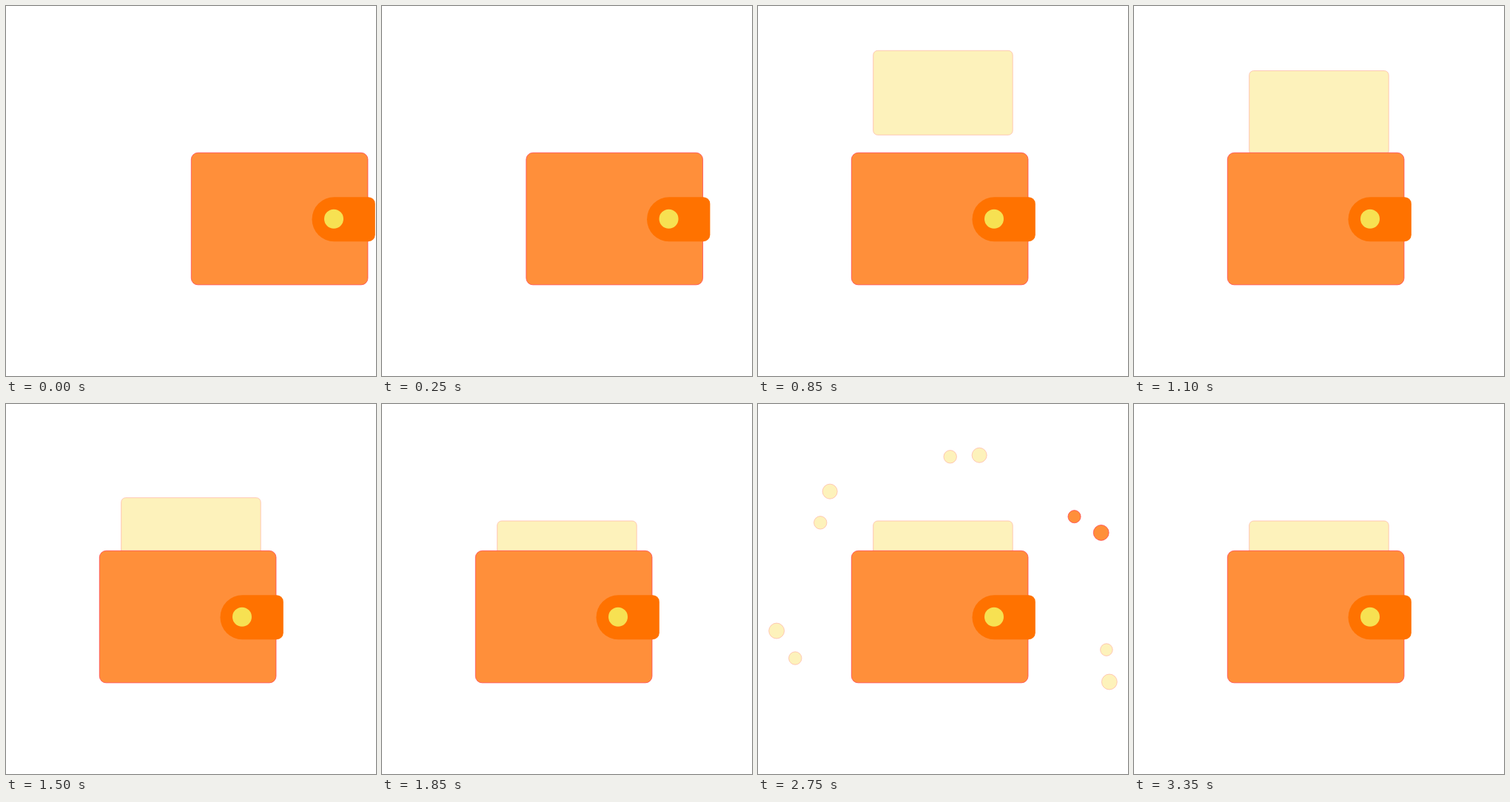
Animation, 500 px wide and 500 px high, one loop 3.4 s. Source, as an HTML page with a canvas:

```html
<!DOCTYPE html>
<html lang="en">
<head>
<meta charset="utf-8">
<title>Wallet</title>
<style>
  html, body { margin: 0; width: 100%; height: 100%; overflow: hidden; background: #fff; }
  canvas { display: block; width: 500px; height: 500px; }
</style>
</head>
<body>
<canvas id="stage" width="500" height="500"></canvas>
<script>
const ctx = document.getElementById('stage').getContext('2d');
const LOOP = 3400, STEP = 50;
const ORANGE = '#ff8f3a', FLAP = '#ff7200', YELLOW = '#f7e152', CREAM = '#fdf2bb';
const RED_EDGE = '#ff3c50', PINK_EDGE = '#ffb4a4';

// Confetti: x, y at unit spread, radius, colour
const CENTER = { x: 249.5, y: 287.5 };
const DOTS = [
  [286, 127, 11.7, CREAM], [257, 128.5, 10.2, CREAM],
  [137.5, 163, 11.7, CREAM], [128, 194, 10.2, CREAM],
  [84.5, 301.5, 12.2, CREAM], [103, 328.7, 10.2, CREAM],
  [412.3, 320.3, 9.7, CREAM], [415.2, 352.2, 12.2, CREAM],
  [380.4, 188, 10, ORANGE], [407, 204, 12.2, ORANGE]
];

const progress = (t, from, to) => Math.min(1, Math.max(0, (t - from) / (to - from)));

function paint(path, fill, edge) {
  ctx.fillStyle = fill;
  ctx.fill(path);
  if (!edge) return;
  ctx.strokeStyle = edge;
  ctx.lineWidth = 0.7;
  ctx.stroke(path);
}

function circle(x, y, r) {
  const path = new Path2D();
  path.arc(x, y, r, 0, Math.PI * 2);
  return path;
}

function box(x, y, w, h, radii) {
  const path = new Path2D();
  path.roundRect(x, y, w, h, radii);
  return path;
}

const noteCorner = new Path2D('M-69.5-57L-93.5-33.5H-80.5Q-69.5-33.5-69.5-44.5Z');

function drawNote(t) {
  if (t < 650) return;
  const drop = 49 * progress(t, 650, 1100) + 70.5 * progress(t, 1100, 1820);
  ctx.save();
  ctx.translate(249.7, 95.5 + drop);
  if (t >= 700) paint(box(-94, -57, 188.5, 114, 6), CREAM, PINK_EDGE);
  else {
    paint(circle(-0.2, 0, 28.3), CREAM, PINK_EDGE);
    for (const sx of [-1, 1]) {
      paint(circle(sx * 61.5, 0.3, 12), CREAM, PINK_EDGE);
      for (const sy of [-1, 1]) {
        ctx.save();
        ctx.scale(sx, sy);
        paint(noteCorner, CREAM, PINK_EDGE);
        ctx.restore();
      }
    }
  }
  ctx.restore();
}

function drawDots(t) {
  if (t < 2150 || t >= 3050) return;
  const spread = 1.36 - 0.81 * (1 - progress(t, 2100, 2700)) ** 2;
  const size = 1 - progress(t, 2700, 3050);
  for (const [x, y, r, color] of DOTS) {
    const px = CENTER.x + (x - CENTER.x) * spread;
    const py = CENTER.y + (y - CENTER.y) * spread;
    paint(circle(px, py, r * size), color, color === CREAM ? PINK_EDGE : RED_EDGE);
  }
}

function drawWallet(t) {
  ctx.save();
  ctx.translate(126.3 + 124 * (1 - progress(t, 0, 559)), 0);
  paint(box(0, 198.3, 238.7, 178.5, 9), ORANGE, RED_EDGE);
  paint(box(163.2, 258.2, 85.3, 60, [30, 9, 9, 30]), FLAP);
  paint(circle(192.7, 287.8, 13), YELLOW);
  ctx.restore();
}

const start = performance.now();

function frame() {
  const elapsed = Math.max(0, performance.now() - start) % LOOP;
  const t = Math.floor(elapsed / STEP) * STEP;
  ctx.fillStyle = '#fff';
  ctx.fillRect(0, 0, 500, 500);
  drawDots(t);
  drawNote(t);
  drawWallet(t);
  requestAnimationFrame(frame);
}
frame();
</script>
</body>
</html>
```
